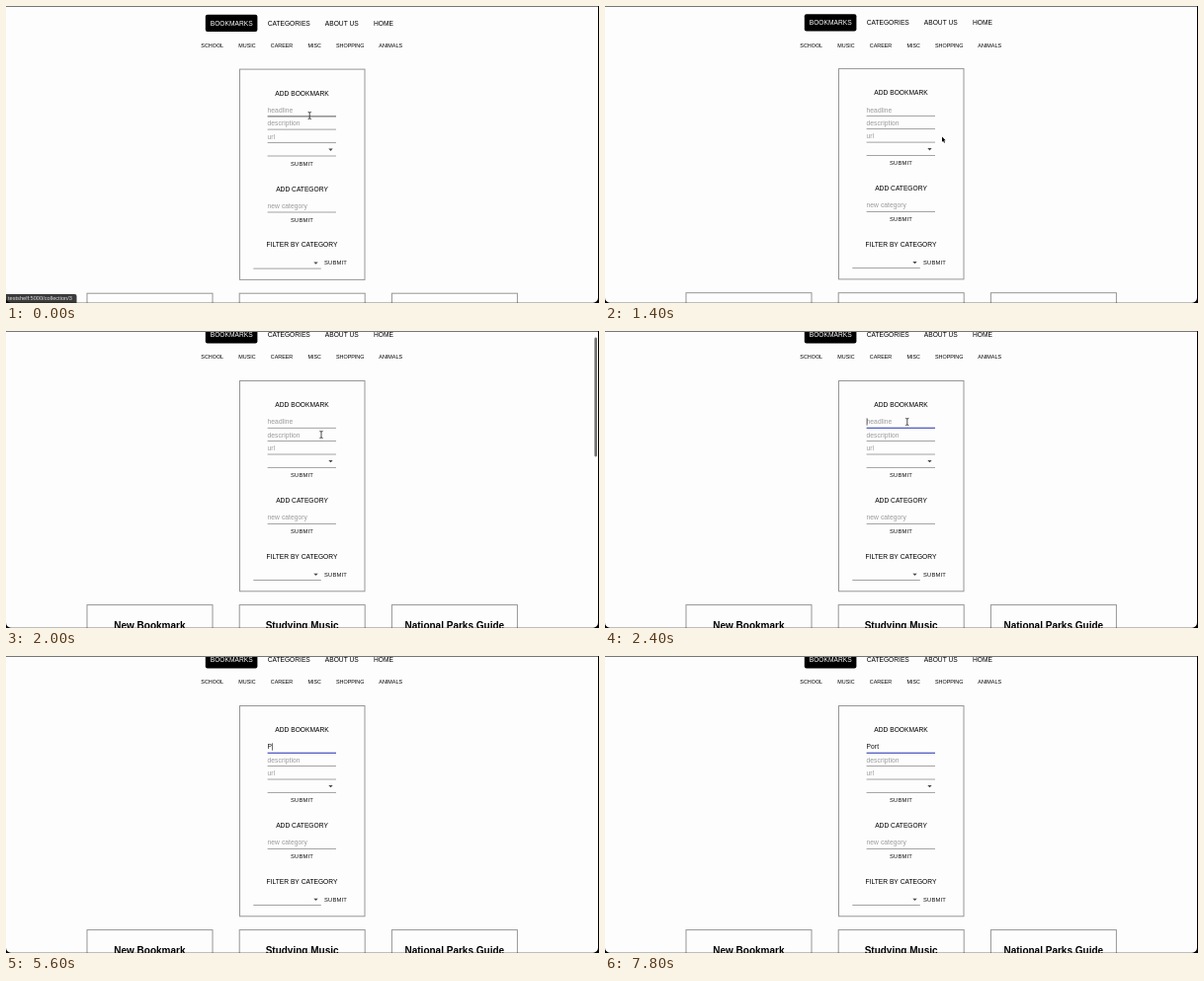
An HTML page with a canvas for the animation above (8 s loop, 600 by 301 pixels).

```html
<!DOCTYPE html>
<html lang="en">
<head>
<meta charset="utf-8">
<title>Bookmarks</title>
<style>
html, body { margin: 0; width: 100%; height: 100%; overflow: hidden; background: #fdfdfd; }
canvas { display: block; width: 600px; height: 301px; }
</style>
</head>
<body>
<canvas id="stage" width="600" height="301"></canvas>
<script>
const ctx = document.getElementById('stage').getContext('2d');
const W = 600, H = 301, LOOP = 8000, STEP = 200;
const FONT = '"Liberation Sans", Arial, sans-serif';
const INK = '#111', HINT = '#999', RULE = '#999', HOVER = '#444', FOCUS = '#4450bd';
const MAX_SCROLL = 13.6;

// Each track is a list of [start time, value], held until the next entry.
const scrollTrack = [[0, 0], [1200, 0.3], [1400, 0.5], [1600, MAX_SCROLL]];
const pointerTrack = [
  [0, ['beam', 307.2, 111]], [200, ['arrow', 337, 121]], [400, ['arrow', 343.5, 129]],
  [600, ['arrow', 342, 132]], [800, ['arrow', 341, 132.5]], [1800, ['arrow', 337, 128]],
  [2000, ['beam', 319, 105]], [2200, ['beam', 305.8, 92]], [5600, null]
];
const typedTrack = [
  [0, ''], [5600, 'P'], [5800, 'Po'], [6200, 'Por'], [6400, 'P'], [6600, ''],
  [6800, 'P'], [7000, 'Po'], [7200, 'Port']
];
const caretTrack = [
  [0, false], [2400, true], [2800, false], [3200, true], [3800, false], [4200, true],
  [4800, false], [5400, true], [6600, false], [6800, true], [7800, false]
];

function at(track, t) {
  let value = track[0][1];
  for (const [start, v] of track) if (t >= start) value = v;
  return value;
}

function text(str, x, y, { size = 6.667, color = INK, align = 'center', weight = 400, gap = 0 } = {}) {
  ctx.font = `${weight} ${size}px ${FONT}`;
  ctx.letterSpacing = gap + 'px';
  ctx.textAlign = align;
  ctx.fillStyle = color;
  ctx.fillText(str, x, y);
  const width = ctx.measureText(str).width;
  ctx.letterSpacing = '0px';
  return width;
}

function rule(x, y, w, color = RULE, h = 0.9) {
  ctx.fillStyle = color;
  ctx.fillRect(x, y - h / 2, w, h);
}

function frame(x, y, w, h) {
  ctx.strokeStyle = '#969696';
  ctx.lineWidth = 1;
  ctx.strokeRect(x, y, w, h);
}

function triangle(x, y) {
  ctx.fillStyle = '#484848';
  ctx.beginPath();
  ctx.moveTo(x - 2.2, y - 1);
  ctx.lineTo(x + 2.2, y - 1);
  ctx.lineTo(x, y + 1.3);
  ctx.fill();
}

const hint = (str, y) => text(str, 264.6, y, { color: HINT, align: 'left', gap: 0.06 });
const submit = (x, y) => text('SUBMIT', x, y, { size: 5.833, gap: 0.167 });

function drawNav() {
  ctx.fillStyle = '#000';
  ctx.beginPath();
  ctx.roundRect(201.8, -4.8, 52.6, 17.2, 2);
  ctx.fill();
  text('BOOKMARKS', 228.2, 6, { color: '#fff' });
  text('CATEGORIES', 286.2, 6, { color: '#000' });
  text('ABOUT US', 339.8, 6, { color: '#000' });
  text('HOME', 382, 6, { color: '#000' });
  const topics = { SCHOOL: 208.7, MUSIC: 244, CAREER: 279, MISC: 312.2, SHOPPING: 348.2, ANIMALS: 389.2 };
  for (const name in topics) text(name, topics[name], 28.4, { size: 5.417, color: '#000' });
}

function drawForm(t) {
  frame(236.5, 50.5, 126.5, 213.3);
  text('ADD BOOKMARK', 299.5, 77.1, { color: '#000' });

  const typed = at(typedTrack, t);
  let caretX = 265;
  if (typed) caretX += text(typed, 264.6, 94.4, { align: 'left', gap: 0.06 }) - 0.1;
  else hint('headline', 94.4);
  if (at(caretTrack, t)) {
    ctx.fillStyle = '#333';
    ctx.fillRect(caretX - 0.3, 88.3, 0.7, 7.4);
  }
  hint('description', 107.7);
  hint('url', 121);

  const focused = t >= 2400;
  const hovered = t < 200 || (t >= 2200 && !focused);
  if (focused) rule(264.6, 98.3, 69.4, FOCUS, 1.2);
  else rule(264.6, 98.3, 69.4, hovered ? HOVER : RULE);
  for (const y of [111.5, 125, 138.4, 195.4]) rule(264.6, y, 69.4);
  triangle(328.5, 132);
  submit(299.5, 148.2);

  text('ADD CATEGORY', 299.5, 174.1, { color: '#000' });
  hint('new category', 191);
  submit(299.5, 205.3);

  text('FILTER BY CATEGORY', 299.5, 230.7, { color: '#000' });
  rule(250.3, 252.5, 68.5);
  triangle(313.5, 246.8);
  submit(333.5, 248.6);
}

function drawCards() {
  ['New Bookmark', 'Studying Music', 'National Parks Guide'].forEach((title, i) => {
    const x = 82 + i * 154.2;
    frame(x, 277.6, 127, 80);
    text(title, x + 63.4, 301.5, { size: 10, weight: 700, color: '#000' });
  });
}

function drawStatus() {
  ctx.fillStyle = '#3b3b3b';
  ctx.beginPath();
  ctx.roundRect(-3, 292, 74.5, 12, 2);
  ctx.fill();
  text('testshelf:5000/collection/3', 2, 298.4, { size: 5.65, color: '#ddd', align: 'left' });
}

function drawWindow() {
  rule(0, 0.5, W, '#777', 1);
  ctx.fillStyle = '#000';
  ctx.beginPath();
  ctx.rect(0, 0, W, H);
  ctx.roundRect(0, -10, 599, H + 9.8, [0, 0, 5, 5]);
  ctx.fill('evenodd');
}

function drawPointer([kind, x, y]) {
  ctx.save();
  ctx.translate(x, y);
  ctx.beginPath();
  if (kind === 'beam') {
    ctx.moveTo(-1.6, -3.6);
    ctx.quadraticCurveTo(0, -3.6, 0, -2.6);
    ctx.quadraticCurveTo(0, -3.6, 1.6, -3.6);
    ctx.moveTo(0, -2.8);
    ctx.lineTo(0, 2.8);
    ctx.moveTo(-1.6, 3.6);
    ctx.quadraticCurveTo(0, 3.6, 0, 2.6);
    ctx.quadraticCurveTo(0, 3.6, 1.6, 3.6);
    ctx.strokeStyle = '#222';
    ctx.lineWidth = 0.8;
    ctx.stroke();
  } else {
    const points = [[0, 0], [0, 5.2], [1.2, 4.2], [2.1, 6.2], [3, 5.8], [2.1, 3.8], [3.7, 3.7]];
    for (const [px, py] of points) ctx.lineTo(px, py);
    ctx.closePath();
    ctx.strokeStyle = '#fff';
    ctx.lineWidth = 0.8;
    ctx.stroke();
    ctx.fillStyle = '#000';
    ctx.fill();
  }
  ctx.restore();
}

function draw(t) {
  ctx.fillStyle = '#fdfdfd';
  ctx.fillRect(0, 0, W, H);

  ctx.save();
  ctx.translate(0, MAX_SCROLL - at(scrollTrack, t));
  drawNav();
  drawForm(t);
  drawCards();
  ctx.restore();

  if (t < 400) drawStatus();
  if (t >= 1600 && t < 2400) {
    ctx.fillStyle = '#6e6e6e';
    ctx.beginPath();
    ctx.roundRect(595.4, 6.6, 2.6, 120.8, 1.3);
    ctx.fill();
  }
  drawWindow();
  const pointer = at(pointerTrack, t);
  if (pointer) drawPointer(pointer);
}

const began = performance.now();
function tick() {
  const t = (performance.now() - began) % LOOP;
  draw(Math.floor(t / STEP) * STEP);
  requestAnimationFrame(tick);
}
tick();
</script>
</body>
</html>
```
